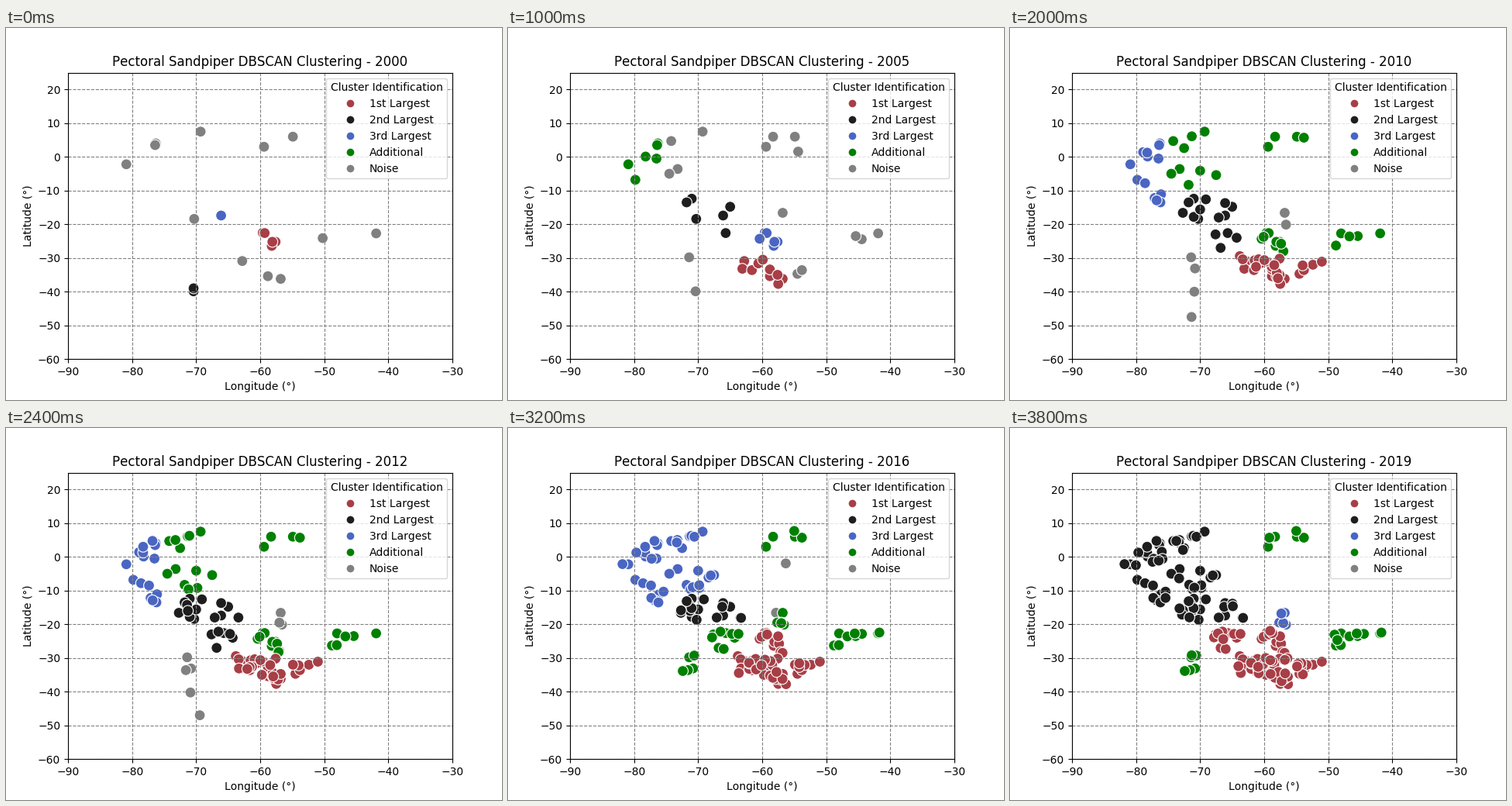
These frames come from a looping animation (640 by 480 pixels, 4000 ms). A matplotlib script:

```python
import numpy as np
import matplotlib.pyplot as plt
from matplotlib.animation import FuncAnimation
from matplotlib.lines import Line2D

RED, BLACK, BLUE, GREEN, GRAY = "#a83e46", "#1f1e1f", "#4a66c2", "green", "gray"
LABELS = {
    "1st Largest": RED,
    "2nd Largest": BLACK,
    "3rd Largest": BLUE,
    "Additional": GREEN,
    "Noise": GRAY,
}
FIRST, LAST = 2000, 2019

# The largest clusters from a given year on, as the regions each one joins
ERAS = {
    2000: ("chaco", "patagonia", "bolivia"),
    2003: ("pampas", "bolivia andes salta", "chaco"),
    2006: ("pampas lagoons", "andes", "coast north"),
    2009: ("pampas lagoons", "andes bolivia salta", "coast"),
    2013: ("coast north", "pampas lagoons", "andes bolivia"),
    2016: ("pampas lagoons chaco", "andes bolivia", "coast north amazon"),
    2018: ("pampas lagoons chaco salta", "coast north amazon andes bolivia", "pantanal"),
}


class Region:
    """Known sites come first, later sightings turn up close to one of them."""

    def __init__(self, seed, start, end, spread, *sites):
        rng = np.random.default_rng(seed)
        self.start, self.end = start, end
        sites = np.array(sites)
        more = sites[rng.integers(len(sites), size=60)] + rng.normal(0, spread, (60, 2))
        self.points = np.vstack([sites, more])

    def seen(self, year):
        growth = ((year - FIRST) / (LAST - FIRST)) ** 1.5
        n = round(self.start + (self.end - self.start) * growth)
        return self.points[:max(n, 0)]


regions = {
    "guyana": Region(1, 2, 6, .8, (-59.4, 3), (-54.9, 6), (-58.3, 6), (-53.8, 5.7)),
    "brazil": Region(2, 1, 11, .9, (-41.9, -22.7), (-45.4, -23.5), (-48, -22.7),
                     (-46.7, -23.6), (-48.8, -26.3)),
    "chile": Region(3, 0, 6, .9, (-71.4, -29.8), (-70.8, -33.1), (-71.6, -33.6)),
    "patagonia": Region(4, 2, -4, .5, (-70.4, -39.9), (-70.4, -39)),
    "pantanal": Region(5, 0, 6, .5, (-56.8, -16.6), (-56.6, -20.1), (-57, -19.5)),
    "north": Region(6, 1, 10, .8, (-69.3, 7.5), (-74.2, 4.7), (-71.3, 6.1), (-72.5, 2.6)),
    "amazon": Region(7, 0, 14, .9, (-73.2, -3.6), (-74.5, -5), (-70, -4.1), (-67.5, -5.4),
                     (-71.8, -8.3), (-69.8, -9.2)),
    "coast": Region(8, 3, 28, .8, (-80.9, -2.2), (-76.3, 4), (-76.4, 3.5), (-78.2, .1),
                    (-76.5, -.5), (-79.8, -6.8), (-77.1, -12.2), (-76.1, -11.1),
                    (-76.2, -13.5), (-78.9, 1.4), (-78.6, -7.8)),
    "andes": Region(9, 1, 16, .7, (-70.3, -18.4), (-71, -12.4), (-71.8, -13.5),
                    (-69.1, -12.6), (-72.7, -16.6), (-71, -17.8), (-70, -15.6)),
    "bolivia": Region(10, 1, 9, .6, (-66.1, -17.4), (-65, -14.8), (-67.1, -18),
                      (-66.1, -13.7), (-63.4, -18)),
    "salta": Region(11, 0, 11, 1.1, (-65.7, -22.6), (-64.3, -24), (-67.6, -23), (-66.8, -27)),
    "chaco": Region(12, 5, 15, .9, (-57.6, -25.2), (-59.6, -22.5), (-58.2, -26.4),
                    (-59.3, -22.6), (-58.1, -25.2), (-60.4, -24.3), (-57, -28)),
    "lagoons": Region(13, 0, 12, .6, (-54.5, -34.7), (-53.8, -33.6), (-52.4, -32),
                      (-51, -31.1), (-54, -32.2)),
    "pampas": Region(14, 3, 58, .9, (-62.8, -30.9), (-58.8, -35.4), (-56.8, -36.2),
                     (-58.8, -33.4), (-57.5, -37.7), (-63.1, -33.2), (-61.6, -33.6),
                     (-60.6, -31.6), (-57.6, -35), (-59.9, -30.5), (-57.6, -30.2)),
}


def strays(year):
    """A few lone birds far south and over the eastern lowlands."""
    rng = np.random.default_rng(year)
    south, east = rng.integers(0, 3, 2)
    return ([(rng.normal(-70, 2), rng.uniform(-52, -38)) for _ in range(south)]
            + [(rng.uniform(-66, -42), rng.uniform(-25, 8)) for _ in range(east)])


def sightings(year):
    era = ERAS[max(y for y in ERAS if y <= year)]
    ranked = {name: color for names, color in zip(era, (RED, BLACK, BLUE))
              for name in names.split()}
    points = strays(year)
    colors = [GRAY] * len(points)
    for name, region in regions.items():
        seen = region.seen(year)
        color = ranked.get(name, GREEN if len(seen) > 3 else GRAY)
        points.extend(seen)
        colors += [color] * len(seen)
    return points, colors


plt.rcParams["text.kerning_factor"] = 6
fig, ax = plt.subplots(figsize=(6.4, 4.8), dpi=100)
ax.set(xlim=(-90, -30), ylim=(-60, 25), xlabel="Longitude (°)", ylabel="Latitude (°)")
ax.set_yticks(range(-60, 21, 10))
ax.grid(color="gray", linestyle="--")
title = ax.set_title("")
dots = ax.scatter([], [], s=100, edgecolors="white", linewidths=.8)
handles = [Line2D([], [], marker="o", color="w", markerfacecolor=c, markersize=8, label=name)
           for name, c in LABELS.items()]
ax.legend(handles=handles, title="Cluster Identification", loc="upper right")


def update(i):
    year = FIRST + i
    points, colors = sightings(year)
    dots.set_offsets(points)
    dots.set_facecolor(colors)
    title.set_text(f"Pectoral Sandpiper DBSCAN Clustering - {year}")
    return dots, title


anim = FuncAnimation(fig, update, frames=LAST - FIRST + 1, interval=200, repeat=True,
                     repeat_delay=0)
plt.show()
```
